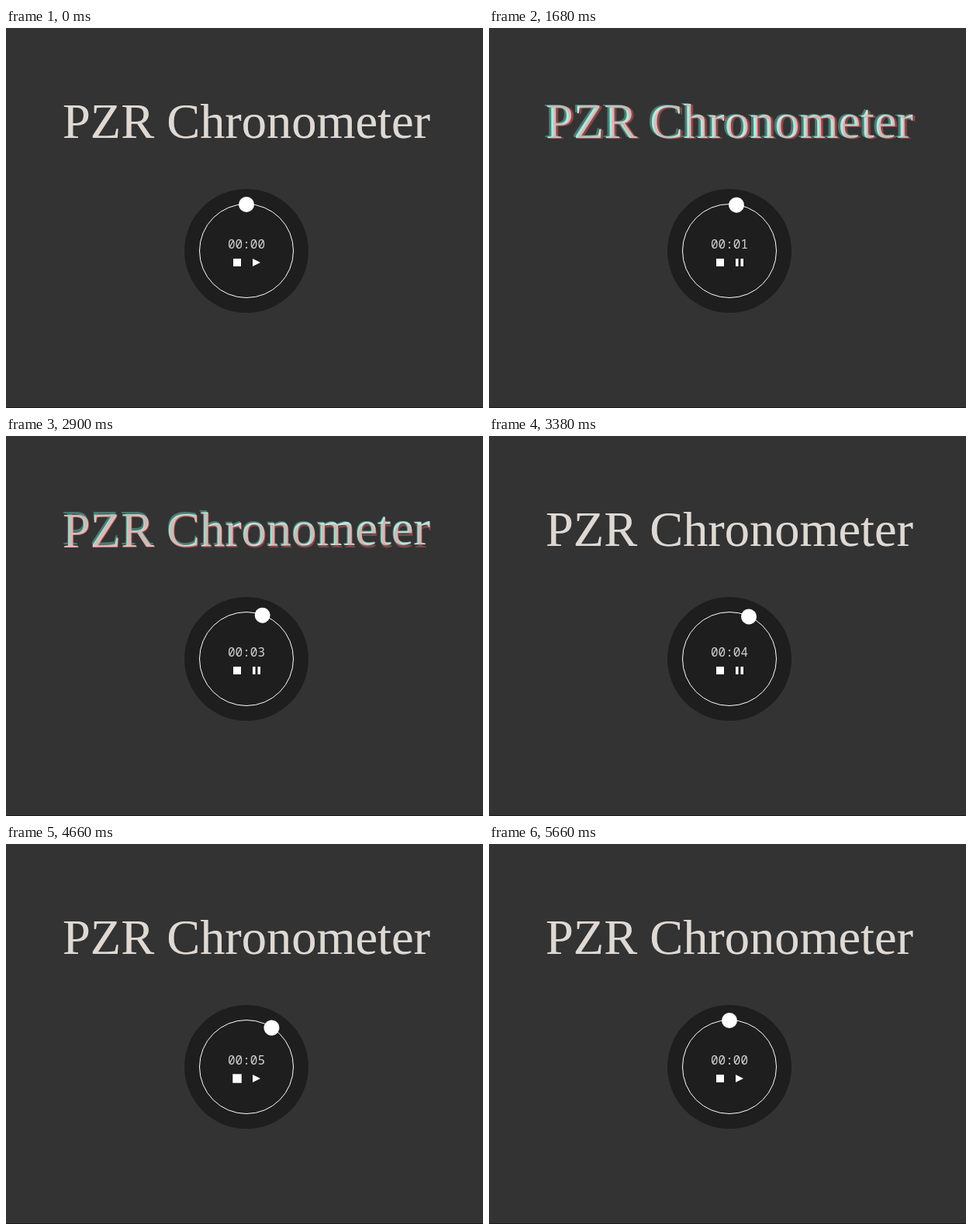
Write an HTML page that moves like this. It is 615 px wide and 491 px high and loops after 5680 ms.

```html
<!DOCTYPE html>
<html lang="en">
<head>
<meta charset="utf-8">
<title>PZR Chronometer</title>
<style>
html, body { margin: 0; width: 100%; height: 100%; overflow: hidden; background: #333; }
.stage { position: relative; width: 615px; height: 491px; overflow: hidden; }
.title span {
  position: absolute; left: 0; top: 84px; width: 620px;
  font: 64.4px/74px "Liberation Serif", "Times New Roman", serif;
  text-align: center; white-space: nowrap;
}
.main { color: #fff; }
.teal { color: #67f3da; }
.red { color: #f16f6f; }
svg { position: absolute; left: 0; top: 0; }
text { font: 300 16px "Noto Sans Mono", monospace; fill: #d4d4d4; text-anchor: middle; }
</style>
</head>
<body>
<div class="stage">
  <div class="title">
    <span class="main">PZR Chronometer</span>
    <span class="teal" aria-hidden="true">PZR Chronometer</span>
    <span class="red" aria-hidden="true">PZR Chronometer</span>
  </div>
  <svg width="615" height="491" fill="#fff">
    <path d="M0 490h615v1H0z" fill="#1c1c1c"/>
    <circle cx="310" cy="288" r="80" fill="#1e1e1e"/>
    <circle cx="310" cy="288" r="60.5" fill="none" stroke="#fff"/>
    <circle id="dot" cx="310" cy="228" r="10"/>
    <text id="clock" x="310" y="284.5">00:00</text>
    <path id="stop" d="M-5-5H5V5H-5z"/>
    <path id="toggle"/>
  </svg>
</div>
<script>
const LOOP = 5680;            // ms
const SPEED = 1.569;          // stopwatch ms per screen ms
const PERIOD = 1593, LEAD = 410;   // glitch cycle and its phase at time 0
const START = 762, PAUSE = 4240, RESET = 4700;
const PLAY_ICON = "M-5-5L5 0L-5 5z";
const PAUSE_ICON = "M-5-5h3.5V5H-5zM1.5-5H5V5H1.5z";

const $ = id => document.getElementById(id);

// Four bursts per cycle: [start, peak, end] as fractions
const BURSTS = [[0, .07, .1], [.27, .3, .35], [.52, .55, .72], [.72, .75, .8]];

function glitch(selector, rest, peak, transforms) {
  const frames = [];
  const add = (offset, transform, opacity) =>
    frames.push({ offset, transform, opacity, easing: "ease" });
  BURSTS.forEach(([from, top, to], i) => {
    add(from, "none", rest);
    add(top, transforms[i], peak);
    add(to, "none", rest);
  });
  add(1, "none", rest);
  const anim = document.querySelector(selector)
    .animate(frames, { duration: PERIOD, iterations: Infinity });
  anim.pause();
  return anim;
}

const SHIFTS = [[2, 3], [5, 2], [5, 1], [2, 6]];
const moves = sign => SHIFTS.map(([x, y]) => `translate(${sign * x}px, ${sign * y}px)`);
const layers = [
  glitch(".main", 1, .75, ["skew(-.5deg, -.9deg)", "skew(.8deg, -.1deg)",
    "skew(-1deg, .2deg)", "skew(.4deg, 1deg)"]),
  glitch(".teal", .25, .5, moves(-1)),
  glitch(".red", .25, .5, moves(1)),
];

const clamp = (v, lo, hi) => Math.min(hi, Math.max(lo, v));
const hover = (t, from, to) =>
  1 + .15 * clamp(Math.min(t - from, to - t) / 80, 0, 1);
const place = (el, x, scale) =>
  el.setAttribute("transform", `translate(${x} 303) scale(${scale})`);

function draw(t) {
  for (const layer of layers) layer.currentTime = t + LEAD;

  const seconds = t < RESET ? (clamp(t, START, PAUSE) - START) * SPEED / 1000 : 0;
  $("dot").setAttribute("transform", `rotate(${seconds * 6} 310 288)`);
  $("clock").textContent = "00:" + String(Math.floor(seconds)).padStart(2, "0");

  const running = t >= START && t < PAUSE;
  $("toggle").setAttribute("d", running ? PAUSE_ICON : PLAY_ICON);
  place($("toggle"), 323, hover(t, 580, 850));
  if (t > 3000) place($("toggle"), 323, hover(t, 3840, 4360));
  place($("stop"), 298, hover(t, 4540, 4860));
}

const begin = performance.now();
(function tick() {
  draw((performance.now() - begin) % LOOP);
  requestAnimationFrame(tick);
})();
</script>
</body>
</html>
```
